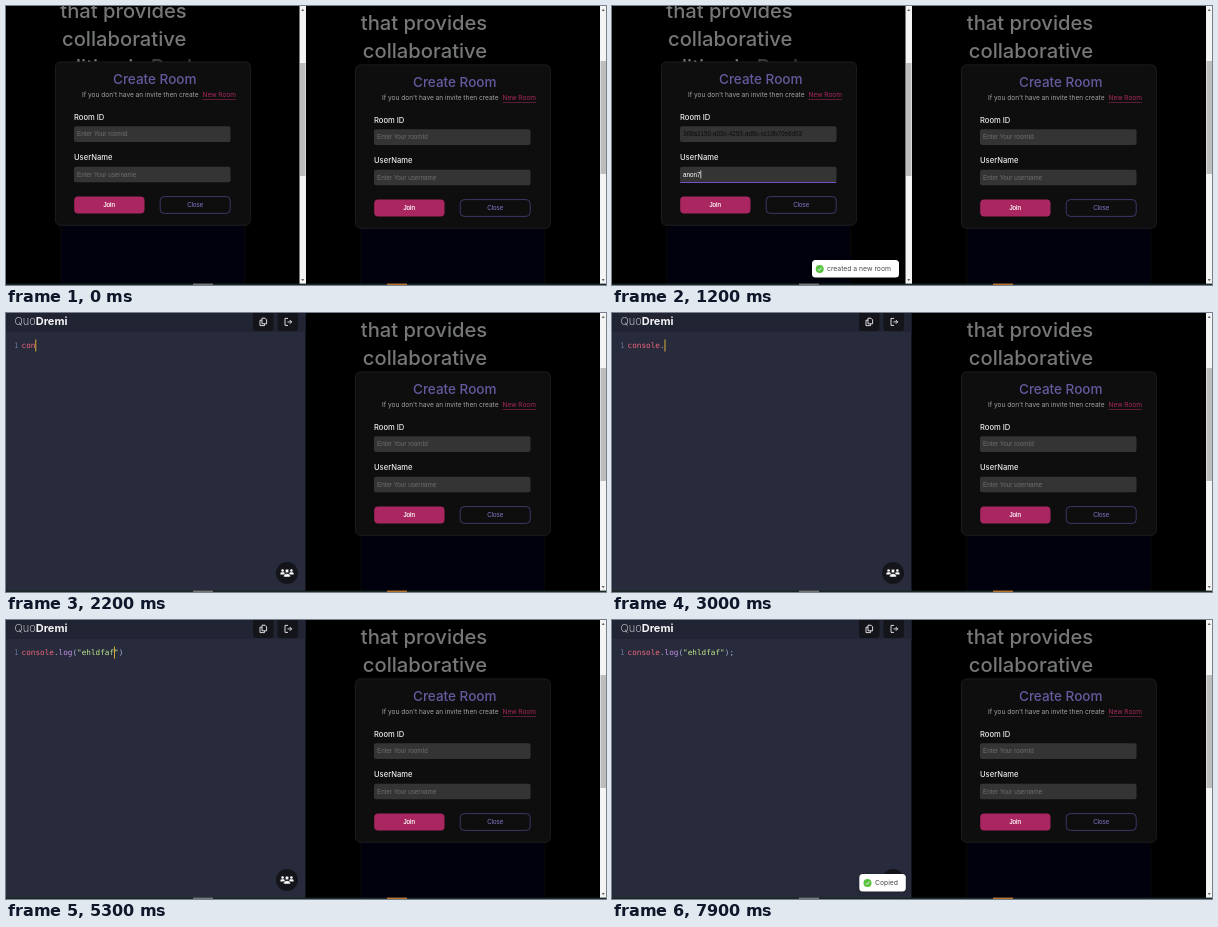
Write an HTML page that moves like this. It is 600 px wide and 279 px high and loops after 8 s.

```html
<!DOCTYPE html>
<html lang="en">
<head>
<meta charset="utf-8">
<title>Shared editor</title>
<style>
html, body { margin: 0; width: 100%; height: 100%; overflow: hidden; background: #000; }
svg { display: block; width: 600px; height: 279px; font-family: Inter, sans-serif; }
.hero { font-size: 20.2px; font-weight: 500; fill: #757876; text-anchor: middle; }
.title { font-size: 13.5px; font-weight: 500; fill: #665a9f; }
.note { font-size: 6.55px; fill: #a3a3a3; }
.label { font-size: 7.6px; font-weight: 500; fill: #ececec; }
.field { fill: #343435; }
.input, .btn { font: 6.3px "Liberation Sans", Arial, sans-serif; }
.input { fill: #6e6e6e; }
.btn { text-anchor: middle; }
.logo { font-size: 11px; fill: #f4f4f6; }
.code { font: 7.7px "DejaVu Sans Mono", monospace; }
.toast text { font-size: 6.8px; fill: #4a4a4a; }
.toast > rect { fill: #fff; filter: drop-shadow(0 1px 2px rgba(0, 0, 0, .3)); }
</style>
</head>
<body>
<svg viewBox="0 0 600 279" xmlns="http://www.w3.org/2000/svg">
  <defs>
    <clipPath id="pane"><rect width="300" height="279"/></clipPath>
    <g id="page">
      <rect x="54" y="215" width="185.5" height="63" fill="#060608"/>
      <rect x="55.5" y="215" width="182.5" height="62" fill="#01000d"/>
      <rect x="49.4" y="55.9" width="195" height="163.4" rx="5" fill="#0e0e0f" stroke="#232324" stroke-width=".8"/>
      <text class="title" x="107" y="77.5">Create Room</text>
      <text class="note" x="76" y="91.4">If you don't have an invite then create</text>
      <text class="note" x="196.5" y="91.4" style="fill:#a8285c">New Room</text>
      <rect x="196.5" y="93" width="33.5" height=".6" fill="#8f2350"/>
      <text class="label" x="68" y="114">Room ID</text>
      <rect class="field" x="68" y="120.3" width="156.5" height="15.6" rx="2"/>
      <text class="label" x="68" y="154">UserName</text>
      <rect class="field" x="68" y="160.7" width="156.5" height="15.6" rx="2"/>
      <rect x="68.2" y="190.4" width="70.3" height="17.2" rx="4" fill="#aa2660"/>
      <text class="btn" x="103.2" y="201" fill="#fff" stroke="#fff" stroke-width=".15">Join</text>
      <rect x="154.2" y="190.6" width="70" height="16.8" rx="4" fill="none" stroke="#52488a" stroke-width=".7"/>
      <text class="btn" x="189.2" y="201" fill="#8075c4">Close</text>
    </g>
    <g id="bar">
      <rect width="6.5" height="279" fill="#f4f4f4"/>
      <path d="M1.7 5 3.2 2.8 4.7 5ZM1.7 273 3.2 275.2 4.7 273Z" fill="#666"/>
    </g>
    <g id="person">
      <circle cy="-2.3" r="1.9"/>
      <path d="M-3.3 3.8V2.6Q-3.3.4-1 .4H1Q3.3.4 3.3 2.6V3.8Z"/>
    </g>
    <g id="tick"><circle r="4" fill="#57c23f"/></g>
  </defs>

  <rect width="600" height="279"/>

  <g id="lobby" clip-path="url(#pane)">
    <text class="hero" x="117.5" y="11.5">that provides</text>
    <text class="hero" x="118.2" y="39.5">collaborative</text>
    <text class="hero" x="118.5" y="67.5" font-weight="700">editing in <tspan fill="#3b3b3d">Real</tspan></text>
    <use href="#page"/>
    <text id="room" class="input" x="71" y="130.3"></text>
    <text id="user" class="input" x="71" y="170.8"></text>
    <rect id="focus" x="68" y="176" width="156.5" height="1" rx=".5" fill="#7450c4"/>
    <rect id="inputCaret" y="164.5" width=".7" height="8" fill="#fff"/>
    <use href="#bar" x="293.5"/>
    <rect x="294" y="57" width="5.5" height="113" fill="#bdbdbd"/>
  </g>

  <g id="editor">
    <rect width="299.5" height="279" fill="#272b3c"/>
    <rect width="299.5" height="19" fill="#212433"/>
    <text class="logo" x="8.5" y="12.2"><tspan font-weight="200">Quo</tspan><tspan font-weight="700">Dremi</tspan></text>
    <g fill="#14151b">
      <rect x="247" y="-3" width="20.5" height="21" rx="3"/>
      <rect x="271.5" y="-3" width="20.5" height="21" rx="3"/>
      <circle cx="281" cy="260" r="11"/>
    </g>
    <g fill="none" stroke="#f0f0f0" stroke-width=".9">
      <path d="M256 5.2H259L260.6 6.8V10.8H256ZM256 7.2H254V12.6H258.6V10.8"/>
      <path d="M282 5.4H279V12.4H282M281.5 8.9H285.6M283.8 7 285.7 8.9 283.8 10.8"/>
    </g>
    <g fill="#fff">
      <use href="#person" transform="translate(276.6 259) scale(.68)"/>
      <use href="#person" transform="translate(285.4 259) scale(.68)"/>
      <use href="#person" x="281" y="260.3" stroke="#14151b" stroke-width=".6"/>
    </g>
    <text class="code" x="8" y="34.7" fill="#676e95">1</text>
    <text id="code" class="code" x="15.5" y="34.7"></text>
    <rect id="caret" y="26.5" width=".8" height="12" fill="#ffcc33"/>
  </g>

  <g>
    <text class="hero" x="418" y="24">that provides</text>
    <text class="hero" x="419" y="52">collaborative</text>
    <use href="#page" x="300" y="3"/>
    <text class="input" x="371" y="133.3">Enter Your roomId</text>
    <text class="input" x="371" y="173.8">Enter Your username</text>
    <use href="#bar" x="594"/>
    <rect x="594.5" y="55" width="5.5" height="113" fill="#bdbdbd"/>
  </g>

  <rect y="277.6" width="600" height="1.4" fill="#1b2926"/>
  <rect x="187" y="277.6" width="20" height="1.4" fill="#777"/>
  <rect x="381" y="277.6" width="20" height="1.4" fill="#b8742c"/>

  <g id="created" class="toast">
    <rect x="200" y="254" width="87" height="17.5" rx="3.5"/>
    <g transform="translate(207.7 263)"><g class="icon"><use href="#tick"/><path d="M-1.8.1-.5 1.5 1.9-1.5" fill="none" stroke="#fff" stroke-width=".8"/></g></g>
    <text x="215" y="265.4">created a new room</text>
  </g>
  <g id="copied" class="toast">
    <rect x="247.3" y="254" width="46.5" height="17.5" rx="3.5"/>
    <g transform="translate(255.5 263)"><g class="icon"><use href="#tick"/><path d="M-1.8.1-.5 1.5 1.9-1.5" fill="none" stroke="#fff" stroke-width=".8"/></g></g>
    <text x="263" y="265.4">Copied</text>
  </g>
</svg>
<script>
const LOOP = 8000, JOIN = 1300, CHAR = 4.635;
const $ = id => document.getElementById(id);
const show = (el, on) => el.setAttribute('visibility', on ? 'visible' : 'hidden');
const clamp = v => Math.max(0, Math.min(1, v));
const count = (times, t) => times.filter(k => k <= t).length;

const source = 'console.log("ehldfaf");';
const keys = [1900, 2000, 2200, 2500, 2600, 2700, 2800, 3000, 3100, 3200, 3300, 3500,
  3800, 4000, 4100, 4300, 4500, 4700, 4900, 5100, 5600, 5800, 6100];
const userKeys = [600, 700, 900, 1000, 1100];
const span = (text, color) => `<tspan fill="${color}">${text}</tspan>`;

// The editor closes brackets and quotes by itself.
const closing = n => n < 12 || n > 21 ? '' : n > 12 && n < 21 ? '")' : ')';
const highlight = text => text.replace(/("[^"]*")|(^\w+)|(\w+)|([^\w"])/g,
  (m, str, name, prop) => span(m, str ? '#c3e88d' : name ? '#f0647a' : prop ? '#c792ea' : '#a6accd'));

function setText(el, html) {
  if (el.shown !== html) el.innerHTML = el.shown = html;
}

function toast(el, t, from, to) {
  const age = t - from, on = age >= 0 && t < to;
  show(el, on);
  if (!on) return;
  el.setAttribute('opacity', .5 + .5 * clamp(age / 200));
  el.setAttribute('transform', `translate(0 ${3 * (1 - clamp(age / 200)) ** 2})`);
  const icon = el.querySelector('.icon');
  icon.setAttribute('transform', `scale(${clamp((age + 40) / 300)})`);
  icon.lastChild.setAttribute('opacity', clamp((age - 150) / 150));
}

function lobby(t) {
  const typed = 'anon7'.slice(0, count(userKeys, t));
  const focused = t >= 500;
  setText($('room'), t < 200 ? 'Enter Your roomid' : span('368a3150-a03c-4293-ad8c-cc19b70e6d03', '#0c0c0d'));
  setText($('user'), typed ? span(typed, '#fff') : 'Enter Your username');
  show($('focus'), focused);
  show($('inputCaret'), focused);
  $('inputCaret').setAttribute('x', 71 + (typed ? $('user').getComputedTextLength() : 0));
}

function editor(t) {
  const n = count(keys, t);
  setText($('code'), highlight(source.slice(0, n) + closing(n)));
  $('caret').setAttribute('x', 15.5 + n * CHAR);
  show($('caret'), n && (t < 6500 || t >= 7000 && t < 7200));
}

function draw() {
  const t = Math.floor(performance.now() % LOOP / 100) * 100;
  const joined = t >= JOIN;
  $('lobby').style.display = joined ? 'none' : '';
  $('editor').style.display = joined ? '' : 'none';
  (joined ? editor : lobby)(t);
  toast($('created'), t, 200, JOIN);
  toast($('copied'), t, 7400, LOOP);
  requestAnimationFrame(draw);
}
draw();
</script>
</body>
</html>
```
